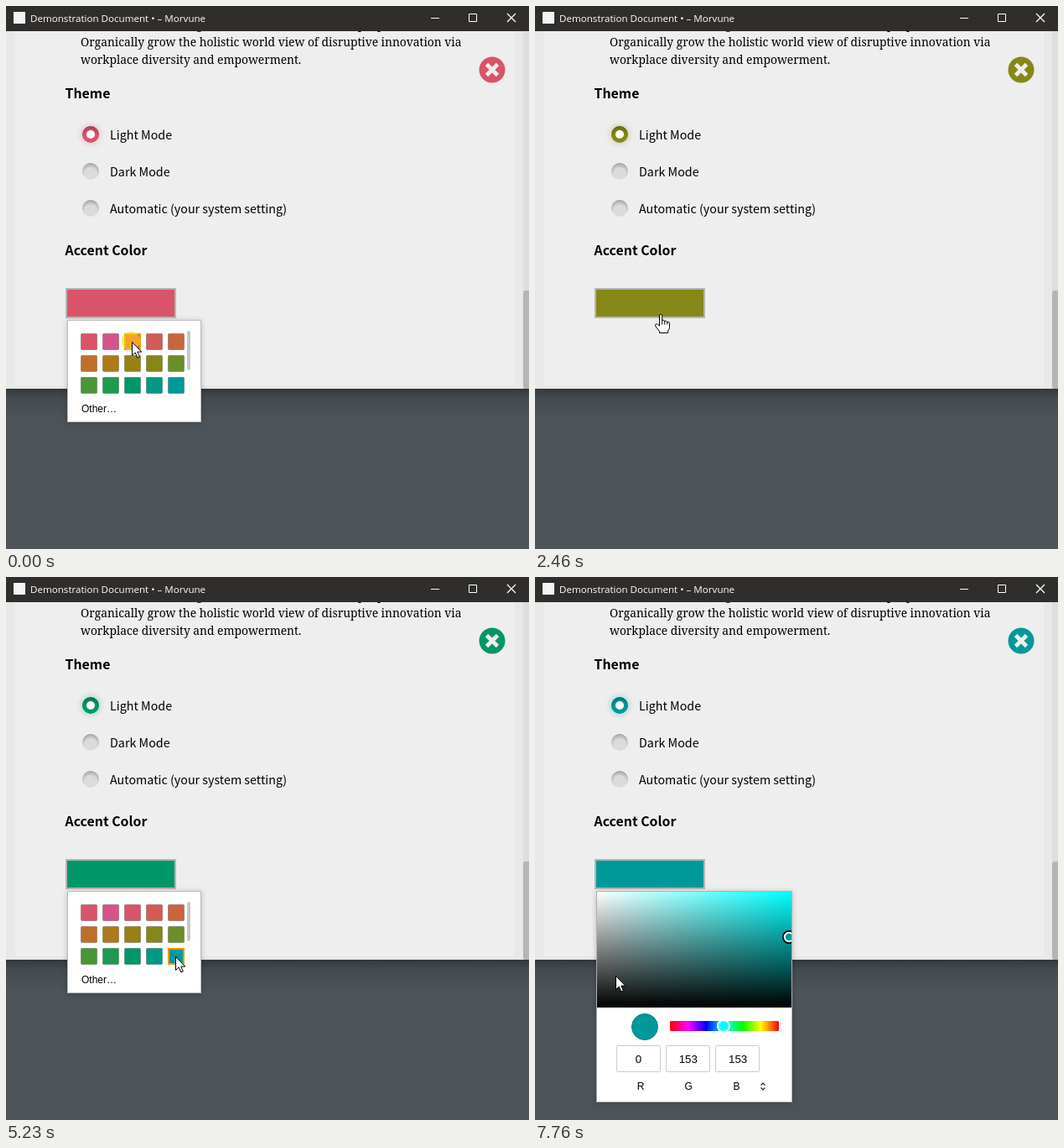
An HTML page for the animation above (8000 ms loop, 624x647 px).

```html
<!DOCTYPE html>
<html lang="en">
<head>
<meta charset="utf-8">
<title>Accent color settings</title>
<style>
html, body { margin: 0; width: 100%; height: 100%; overflow: hidden; background: #4c545a; }
svg { display: block; width: 100%; height: 100%; }
.title { font: 11.6px "Open Sans", sans-serif; fill: #fff; }
.serif { font: 13.8px "Noto Serif", serif; }
.label { font: 14.3px "Noto Sans CJK JP", "Noto Sans CJK SC", "Noto Sans", sans-serif; }
.head { font: bold 15.9px "Noto Sans CJK JP", "Noto Sans CJK SC", "Noto Sans", sans-serif; }
.ui { font: 12px "Liberation Sans", sans-serif; }
.value { font: 13.3px "Liberation Sans", sans-serif; }
.mid { text-anchor: middle; }
.accent { fill: var(--accent); }
.radio { fill: var(--radio); }
.line { fill: none; stroke: #fff; }
#popup, #picker { filter: drop-shadow(0 1px 3px rgba(0,0,0,.22)); }
</style>
</head>
<body>
<svg id="stage" viewBox="0 0 624 647">
  <defs>
    <linearGradient id="windowShadow" x2="0" y2="1">
      <stop stop-color="#000" stop-opacity=".34"/>
      <stop offset=".3" stop-color="#000" stop-opacity=".12"/>
      <stop offset="1" stop-color="#000" stop-opacity="0"/>
    </linearGradient>
    <radialGradient id="inset" cy=".68" r=".68">
      <stop offset=".55" stop-color="#000" stop-opacity="0"/>
      <stop offset="1" stop-color="#000" stop-opacity=".27"/>
    </radialGradient>
    <linearGradient id="saturation">
      <stop stop-color="#fff"/><stop offset="1" stop-color="#0ff"/>
    </linearGradient>
    <linearGradient id="darkness" x2="0" y2="1">
      <stop stop-color="#000" stop-opacity="0"/><stop offset="1"/>
    </linearGradient>
    <linearGradient id="hue"></linearGradient>
    <clipPath id="fieldClip"><path d="M74 375h232v138H74z"/></clipPath>
    <filter id="soft" x="-50%" y="-50%" width="200%" height="200%"><feGaussianBlur stdDeviation="2.5"/></filter>
  </defs>

  <rect width="624" height="647" fill="#4c545a"/>
  <rect y="456" width="624" height="36" fill="url(#windowShadow)"/>

  <rect width="624" height="456" fill="#e8e8e8"/>
  <rect x="11" y="30" width="596" height="422" fill="#eee"/>
  <rect x="617" y="30" width="7" height="426" fill="#dedede"/>
  <rect x="617" y="339" width="9" height="117" rx="3" fill="#b5b5b5"/>

  <g class="serif">
    <text x="89" y="27">collaborative thinking to further the overall value proposition.</text>
    <text x="89" y="48">Organically grow the holistic world view of disruptive innovation via</text>
    <text x="89" y="69">workplace diversity and empowerment.</text>
  </g>

  <rect width="624" height="30" fill="#302e2c"/>
  <rect x="9" y="7" width="14" height="14" fill="#f4f4f4"/>
  <text class="title" x="29" y="19">Demonstration Document • – Morvune</text>
  <path class="line" d="M507 14.5h10M552.5 9.5h9v9h-9z"/>
  <path class="line" stroke-width="1.3" d="M598 9l10 10m0-10l-10 10"/>

  <circle class="accent" cx="580" cy="76" r="15.5"/>
  <path d="M573.5 69.5l13 13m0-13l-13 13" stroke="#eee" stroke-width="4.8"/>

  <text class="head" x="70.5" y="110">Theme</text>
  <text class="head" x="70.5" y="297">Accent Color</text>
  <circle class="radio" cx="101" cy="153" r="13" opacity=".18" filter="url(#soft)"/>
  <g id="options"></g>
  <circle cx="101" cy="153" r="5" fill="#fff"/>

  <rect class="accent" x="72" y="337" width="130" height="34" stroke="#b5b5b5" stroke-width="2"/>

  <g id="popup">
    <rect x="73.5" y="374.5" width="159" height="121" fill="#fff" stroke="#bbb"/>
    <g id="swatches"></g>
    <rect x="216" y="387" width="4" height="47" rx="2" fill="#c8c8c8"/>
    <text class="ui" x="90" y="484">Other…</text>
    <rect id="hover" width="18" height="18" fill="none" stroke="#e79c08" stroke-width="2"/>
  </g>

  <g id="picker">
    <rect x="73.5" y="374.5" width="233" height="251" fill="#fff" stroke="#b0b0b0"/>
    <rect x="74" y="375" width="232" height="138" fill="url(#saturation)"/>
    <rect x="74" y="375" width="232" height="138" fill="url(#darkness)"/>
    <g clip-path="url(#fieldClip)">
      <circle cx="303" cy="429" r="8" fill="#000"/>
      <circle cx="303" cy="429" r="5.2" fill="#099" stroke="#fff" stroke-width="2"/>
    </g>
    <circle cx="131" cy="536" r="15.5" fill="#099" stroke="#007d7d"/>
    <rect x="161" y="529" width="130" height="12" rx="1.5" fill="url(#hue)"/>
    <circle cx="225" cy="535" r="7" fill="#0ff" stroke="#fff" stroke-width="2"/>
    <g id="channels"></g>
    <path d="M269.5 605.5l2.5-2.5 2.5 2.5m-5 3l2.5 2.5 2.5-2.5" fill="none" stroke="#222" stroke-width="1.2"/>
  </g>

  <circle id="ring" r="11" fill="#ffd800" opacity=".62"/>
  <g id="cursor" fill="#fff" stroke="#000" stroke-linejoin="round">
    <path id="arrow" d="M.5 .5v16l3.7-3.5 2.6 6 2.6-1.1-2.6-5.8h5z"/>
    <path id="hand" d="M-1.5 14V2Q-1.5 .5 .1 .5T1.7 2v5.5q2.6-1 3 1 2.5-.8 3 1 2.8-.6 2.8 1.8v4.2q0 2.5-1.8 4.5v2.5H-1.5v-1.8L-6 14.8q-1.3-2 .2-2.7 1.4-.5 2.5.6zM1.7 7.5v5m3-4v4m3-3v3"/>
  </g>
</svg>
<script>
const LOOP = 8000;
const $ = id => document.getElementById(id);
const fill = (id, items, markup) => { $(id).innerHTML = items.map(markup).join(''); };

const palette = (
  '#d9546a #d4548a #d9536c #d55a56 #cc643f ' +
  '#bf6f2a #ae7a1c #978115 #858818 #6b8e28 ' +
  '#4b9437 #1f9a50 #009768 #009a84 #009999').split(' ');
const cell = i => [89 + 26 * (i % 5), 390 + 26 * Math.floor(i / 5)];

fill('swatches', palette, (color, i) => {
  const [x, y] = cell(i);
  return `<rect x="${x + .5}" y="${y + .5}" width="19" height="19" rx="1" fill="${color}" stroke="#000" stroke-opacity=".25"/>`;
});

fill('options', ['Light Mode', 'Dark Mode', 'Automatic (your system setting)'], (name, i) => {
  const y = 153 + 44 * i;
  return `<circle cx="101" cy="${y}" r="10" ${i ? 'fill="#dbdbdb"' : 'class="radio"'}/>
    <circle cx="101" cy="${y}" r="10" fill="url(#inset)"/>
    <text class="label" x="124" y="${y + 6}">${name}</text>`;
});

fill('hue', [...Array(7).keys()], i =>
  `<stop offset="${i / 6}" stop-color="hsl(${360 - 60 * i} 100% 50%)"/>`);

fill('channels', ['R', 'G', 'B'], (name, i) => {
  const x = 123.5 + 59.3 * i;
  return `<rect x="${Math.round(x) - 26.5}" y="558.5" width="52" height="31" rx="1" fill="#fff" stroke="#ccc"/>
   <text class="value mid" x="${x}" y="579">${i ? 153 : 0}</text>
   <text class="ui mid" x="${126 + 57.2 * i}" y="611">${name}</text>`;
});

// Each visit: rest on the button, open the popup, press a swatch (or "Other…"), release.
const visits = [
  { home: [150, 361], open: -1000, press: 0, pick: 330, swatch: 2 },
  { home: [150, 361], open: 880, press: 1520, pick: 1680, swatch: 8 },
  { home: [150, 367], open: 2930, press: 3710, pick: 3790, swatch: 12 },
  { home: [150, 361], open: 4590, press: 5450, pick: 5530, swatch: 14 },
  { home: [148, 372], open: 6420, press: 7440, pick: 7600 }];
const OTHER = [96, 482], PICKER_REST = [96, 475];
const pickerTime = visits.at(-1).pick;

const between = (t, from, to) => t >= from && t < to;
const progress = (t, start, duration) => Math.min(1, Math.max(0, (t - start) / duration));
const easeOut = u => 1 - (1 - u) ** 4;
const easeInOut = u => u < .5 ? 4 * u ** 3 : 1 - 4 * (1 - u) ** 3;
const mix = (a, b, k) => a.map((v, i) => v + (b[i] - v) * k);
const rgb = hex => [1, 3, 5].map(i => parseInt(hex.slice(i, i + 2), 16));
const show = (id, on) => { $(id).style.display = on ? '' : 'none'; };
const move = (id, x, y) => $(id).setAttribute('transform', `translate(${x} ${y})`);

function targetOf({ swatch }) {
  if (swatch === undefined) return OTHER;
  const [x, y] = cell(swatch);
  return [x + 9, y + 10];
}

function pointerAt(t) {
  let point = visits[0].home, released = -LOOP;
  for (const visit of visits) {
    point = mix(point, visit.home, easeInOut(progress(t, released, 500)));
    point = mix(point, targetOf(visit), easeOut(progress(t, visit.open, 390)));
    released = visit.pick;
  }
  return mix(point, PICKER_REST, progress(t, pickerTime, 160)).map(Math.round);
}

function accentAt(t, duration) {
  let color = rgb(palette[0]);
  for (const { pick, swatch } of visits)
    if (swatch !== undefined) color = mix(color, rgb(palette[swatch]), progress(t, pick, duration));
  return `rgb(${color.map(Math.round)})`;
}

function draw(now) {
  const t = now % LOOP;
  const [x, y] = pointerAt(t);
  const style = $('stage').style;
  style.setProperty('--accent', accentAt(t, 290));
  style.setProperty('--radio', accentAt(t, 430));

  show('popup', visits.some(v => between(t, v.open, v.pick)));
  show('picker', t >= pickerTime);
  show('ring', visits.some(v => between(t, v.press, v.pick) || between(t, v.open - 80, v.open)));
  show('hand', y < 373);
  show('arrow', y >= 373);

  const hovered = palette.map((_, i) => cell(i))
    .find(([cx, cy]) => between(x, cx, cx + 20) && between(y, cy, cy + 20));
  show('hover', hovered);
  if (hovered) move('hover', hovered[0] + 1, hovered[1] + 1);
  move('cursor', x, y);
  move('ring', x - 1, y - 1);
  requestAnimationFrame(draw);
}
requestAnimationFrame(draw);
</script>
</body>
</html>
```
